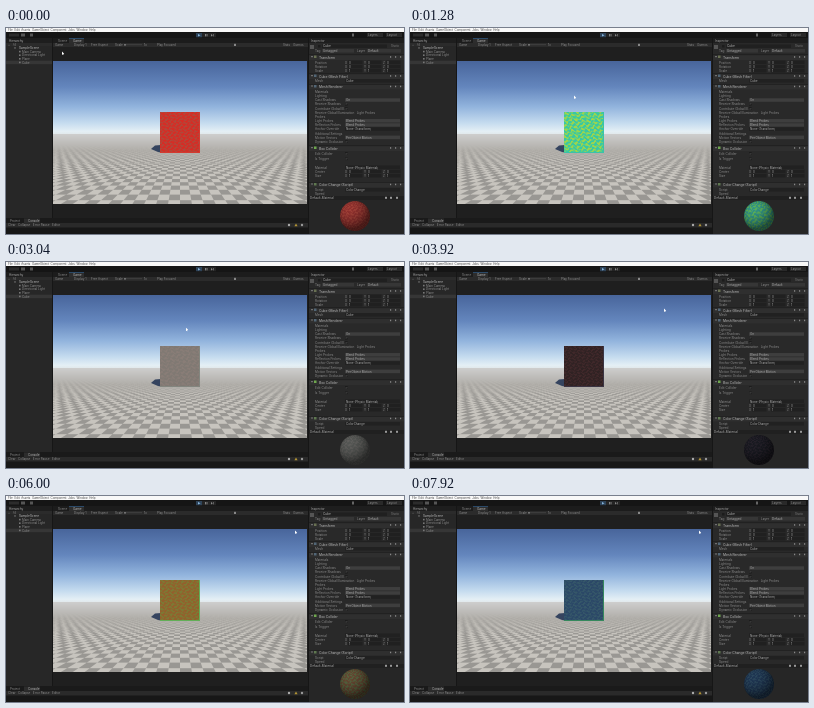
Animation of 398x206 px, one loop 8 s. Source, as an HTML page with a canvas:

```html
<!DOCTYPE html>
<html lang="en">
<head>
<meta charset="utf-8">
<title>Cube colour change in an editor</title>
<style>
html, body { margin: 0; width: 100%; height: 100%; overflow: hidden; background: #191919; }
canvas { display: block; }
</style>
</head>
<body>
<canvas id="stage" width="398" height="206"></canvas>
<script>
const W = 398, H = 206, LOOP = 8000, STEP = 80;
const stage = document.getElementById('stage').getContext('2d');
const layer = (w, h) => Object.assign(document.createElement('canvas'), { width: w, height: h });
const back = layer(W, H);
let g = back.getContext('2d');

const box = (x, y, w, h, c) => { g.fillStyle = c; g.fillRect(x, y, w, h); };
const text = (s, x, y, c = '#8c8c8c', size = 3.1) => {
  g.font = size + 'px Inter, Roboto, sans-serif';
  g.fillStyle = c;
  g.fillText(s, x, y);
};
const poly = (c, ...p) => {
  g.fillStyle = c;
  g.beginPath();
  for (let i = 0; i < p.length; i += 2) g.lineTo(p[i], p[i + 1]);
  g.fill();
};
const disc = (x, y, r, c) => {
  g.fillStyle = c;
  g.beginPath();
  g.arc(x, y, r, 0, 7);
  g.fill();
};
const clamp = v => Math.max(0, Math.min(1, v));
const mix = (a, b, k) => a + (b - a) * k;
const rgb = h => [0, 2, 4].map(i => parseInt(h.substr(i, 2), 16));

// Paints every pixel of a w by h area from a function returning [r, g, b, a].
function shade(w, h, pixel) {
  const c = layer(w, h), q = c.getContext('2d'), img = q.createImageData(w, h);
  for (let y = 0, i = 0; y < h; y++)
    for (let x = 0; x < w; x++, i += 4) img.data.set(pixel(x, y), i);
  q.putImageData(img, 0, 0);
  return c;
}

function drawScene() {
  const sky = g.createLinearGradient(0, 33, 0, 107);
  [[0, '#48659b'], [.35, '#6486bd'], [.62, '#92b4dd'], [.84, '#c6dcef'], [.95, '#e4eff5'], [1, '#e0e6e8']]
    .forEach(([at, c]) => sky.addColorStop(at, c));
  box(47, 33, 254, 143, sky);

  // Perspective checker: horizon 104.5, twelve tiles along the cube's side
  const N = 5, focal = 62, tiles = 12;
  const dark = [153, 151, 147], light = [199, 196, 190], mist = [205, 205, 204];
  const floor = shade(254, 70, (px, py) => {
    let sum = 0;
    for (let j = 0; j < N; j++) for (let i = 0; i < N; i++) {
      const z = focal / (py + 1.5 + (j + .5) / N);
      const x = (px + (i + .5) / N - 127) * z / 124;
      sum += (Math.floor(x * tiles + 600) + Math.floor(z * tiles)) & 1;
    }
    const k = mix(.5, sum / N / N, clamp((py - 10) / 22)), haze = 1 - clamp(py / 16);
    return [...dark.map((v, n) => mix(mix(v, light[n], k), mist[n], haze)), 255];
  });
  g.drawImage(floor, 47, 106);
  poly('#35445f', 145, 121, 149, 117.5, 155, 117, 155, 124.5, 152, 124);
}

function drawHeader(y, name, icon) {
  box(303, y - 4, 95, 5.5, '#2f2f2f');
  box(303, y - 4, 95, .6, '#191919');
  poly('#888', 305, y - 2.5, 307, y - 2.5, 306, y - .8);
  box(308, y - 3, 2.5, 2.5, icon);
  text(name, 313, y, '#bbb', 3.3);
  [384, 389, 394].forEach(x => box(x, y - 2.3, 1.2, 1.5, '#888'));
}
function drawField(label, y, value, fill = '#212121') {
  text(label, 309, y);
  if (value === true) { box(339, y - 2.5, 2.6, 2.6, '#1c1c1c'); text('✓', 339, y, '#999', 3); }
  else if (value) { box(339, y - 3, 55, 3.5, fill); text(value, 340, y, '#aaa', 3); }
}
function drawVector(label, y, n) {
  text(label, 309, y);
  ['X', 'Y', 'Z'].forEach((a, i) => {
    const x = 339 + i * 19;
    text(a, x, y, '#888', 3);
    box(x + 3, y - 3, 14.5, 3.5, '#202020');
    text(n, x + 4, y, '#aaa', 3);
  });
}

function drawInspector() {
  const menu = '#3e3e3e';
  box(303, 10, 95, 196, '#292929');
  box(303, 10, 95, 5, '#1e1e1e');
  text('Inspector', 305, 13.6, '#aaa');
  box(304, 17, 4, 4, '#555');
  box(312, 17, 2.5, 2.5, '#1c1c1c');
  box(316, 16.5, 65, 3.5, '#202020');
  text('Cube', 317, 19.3, '#bbb');
  text('Static', 385, 19.3, '#777');
  text('Tag', 309, 24);
  box(316, 21, 32, 3.6, '#363636');
  text('Untagged', 317, 24, '#aaa');
  text('Layer', 351, 24);
  box(361, 21, 34, 3.6, '#363636');
  text('Default', 362, 24, '#aaa');

  drawHeader(30.5, 'Transform', '#687052');
  drawVector('Position', 35.5, '0');
  drawVector('Rotation', 39.8, '0');
  drawVector('Scale', 44, '1');
  drawHeader(49.5, 'Cube (Mesh Filter)', '#526676');
  drawField('Mesh', 54, 'Cube');
  drawHeader(60, 'Mesh Renderer', '#526676');
  [
    ['Materials'], ['Lighting'], ['Cast Shadows', 'On', menu], ['Receive Shadows', true],
    ['Contribute Global Ill.', true], ['Receive Global Illumination   Light Probes'], ['Probes'],
    ['Light Probes', 'Blend Probes', menu], ['Reflection Probes', 'Blend Probes', menu],
    ['Anchor Override', 'None (Transform)'], ['Additional Settings'],
    ['Motion Vectors', 'Per Object Motion', menu], ['Dynamic Occlusion', true]
  ].forEach(([l, v, c], i) => drawField(l, 65 + i * 4.15, v, c));
  drawHeader(121.5, 'Box Collider', '#6fa84e');
  drawField('Edit Collider', 126.5, true);
  drawField('Is Trigger', 132, true);
  drawField('Material', 140.5, 'None (Physic Material)');
  drawVector('Center', 144.7, '0');
  drawVector('Size', 149, '1');
  drawHeader(158, 'Color Change (Script)', '#5f7850');
  drawField('Script', 163, 'ColorChange');
  text('Speed', 309, 167);
  box(303, 168, 95, 4, '#202020');
  text('Default-Material', 304, 171, '#aaa');
  [379, 384, 390].forEach(x => box(x, 168.8, 2, 2, '#999'));
  box(303, 172, 95, 34, '#262626');
}

function drawEditor() {
  box(0, 0, W, H, '#161616');
  box(0, 0, W, 4, '#f8f8f8');
  text('File  Edit  Assets  GameObject  Component  Jobs  Window  Help', 2, 3.1, '#444', 2.9);
  box(0, 4, W, 6, '#151515');
  box(3, 5.5, 10, 3, '#2c2c2c');
  box(15, 5.5, 4, 3, '#555');
  box(24, 5.5, 3, 3, '#555');
  box(190, 5, 20, 4.2, '#242424');
  box(190, 5, 6, 4.2, '#2e4358');
  poly('#86b4dc', 192, 5.9, 194.5, 7.2, 192, 8.5);
  box(199, 6, .8, 2.4, '#999'); box(200.6, 6, .8, 2.4, '#999');
  poly('#888', 205, 6, 206.8, 7.2, 205, 8.4); box(207, 6, .6, 2.4, '#888');
  box(346, 5.5, 2, 3, '#666');
  ['Layers', 'Layout'].forEach((s, i) => { box(361 + i * 19, 5, 16, 4, '#292929'); text(s, 362 + i * 19, 8.1); });

  box(0, 10, 46, 180, '#272727');
  box(0, 10, 46, 5, '#1e1e1e');
  text('Hierarchy', 3, 13.6, '#aaa');
  box(0, 15, 46, 3, '#2b2b2b');
  text('+   All', 2, 17.6, '#777');
  poly('#888', 8, 19.5, 10, 19.5, 9, 21);
  text('SampleScene', 13, 21.3, '#bbb');
  ['Main Camera', 'Directional Light', 'Plane', 'Cube'].forEach((s, i) => {
    const y = 24.8 + i * 3.6;
    if (i === 3) box(0, y - 2.9, 46, 3.5, '#363636');
    box(13, y - 2, 1.6, 1.6, '#777');
    text(s, 16, y, '#8c8c8c', 3);
  });

  box(47, 10, 255, 180, '#1f1f1f');
  box(47, 10, 255, 5, '#1c1c1c');
  text('Scene', 52, 13.8);
  box(63, 10, 15, 5, '#2d2d2d');
  box(63, 10, 15, .6, '#2c5e90');
  text('Game', 67, 13.8, '#bbb');
  box(47, 15, 255, 4, '#2b2b2b');
  [['Game', 49], ['Display 1', 68], ['Free Aspect', 85], ['Scale', 109], ['1x', 138],
    ['Play Focused', 151], ['Stats', 277], ['Gizmos', 287]].forEach(([s, x]) => text(s, x, 17.8, '#8c8c8c', 3));
  box(118, 16.6, 18, .5, '#555');
  disc(119, 16.8, .9, '#888');
  box(228, 15.8, 2, 2.2, '#888');

  box(0, 190, 302, 5, '#1a1a1a');
  text('Project', 4, 194, '#8c8c8c', 3);
  box(18, 190.5, 16, 4.5, '#2c2c2c');
  text('Console', 22, 194, '#bbb', 3);
  box(0, 195, 302, 4.5, '#2a2a2a');
  text('Clear   Collapse   Error Pause   Editor', 2, 198.2, '#8c8c8c', 3);
  disc(283, 197, 1.2, '#aaa');
  poly('#b39435', 290, 195.6, 291.6, 198.3, 288.4, 198.3);
  disc(296, 197, 1.2, '#999');
  box(0, 200, 302, 6, '#171717');
  drawScene();
  drawInspector();
}

// time, cube base, cube spots, edge, ball base, ball spots, pattern frequency
const looks = [
  [0, 'd62c25', 'b0483a', 'd33a30', '7c2927', '8c3830', 1.9],
  [1280, '38c8a4', '9cd64c', '3bc2a8', '2b8074', '4f9a4e', 1.6],
  [2240, 'c8c8bb', 'cbcabd', 'c4d0b6', '777a70', '828479', 1.4],
  [3920, '302223', '40282a', '3b3443', '15161c', '201c24', 2],
  [5200, '70cdc4', 'b8d096', '68c7d7', '525f8c', '806a92', 2],
  [6000, '93602c', '7c7a34', '62ae57', '573c2a', '4a5636', 1.8],
  [7920, '2b4867', '355769', '35885d', '1a2e47', '253d50', 1.9]
];
function lookAt(t) {
  let i = 0;
  while (i < looks.length - 2 && t >= looks[i + 1][0]) i++;
  const a = looks[i], b = looks[i + 1], k = clamp((t - a[0]) / (b[0] - a[0]));
  const colours = [1, 2, 3, 4, 5].map(n => {
    const p = rgb(a[n]), q = rgb(b[n]);
    return p.map((v, c) => mix(v, q[c], k));
  });
  return [...colours, mix(a[6], b[6], k)];
}
// Wavy, slightly tilted bands broken up by a slower ripple
function spots(x, y, f, phase) {
  const warp = 1.7 * Math.sin(x * f * .36 + phase) + 1.2 * Math.sin(x * f * .83 - y * .5);
  const v = Math.sin(y * f + x * .3 + warp) + .8 * Math.sin(x * f * .7 + 1.6 * Math.sin(y * f * .47 - phase));
  return clamp(v * .6 + .4);
}
const blend = (a, b, k, light = 1) => a.map((v, c) => mix(v, b[c], k) * light);

function drawCube([base, dots, edge, , , f], phase) {
  const w = 40, h = 41;
  g.drawImage(shade(w, h, (x, y) => {
    const rim = x === w - 1 || y === h - 1;
    return [...(rim ? edge : blend(base, dots, spots(x, y, f, phase))), 255];
  }), 154, 84);
}
function drawBall([, , , base, dots, f], phase) {
  const R = 15;
  g.drawImage(shade(32, 32, (px, py) => {
    const x = (px - 15.5) / R, y = (py - 15.5) / R, d = Math.hypot(x, y);
    const z = Math.sqrt(Math.max(0, 1 - d * d));
    const light = .55 + .65 * clamp(-.35 * x - .5 * y + .7 * z);
    const k = spots(Math.atan2(x, z + .01) * 14, Math.asin(Math.max(-1, Math.min(1, y))) * 14, f, phase);
    return [...blend(base, dots, k, light), 255 * clamp((1 - d) * R + .5)];
  }), 333, 172);
}

const path = [
  [0, 56, 23.5], [160, 56, 23.5], [960, 164, 67.5], [2800, 164, 67.5], [3600, 238, 59],
  [3920, 254, 46.5], [4480, 263, 39], [5200, 295, 33.5], [5440, 295, 33.5], [6000, 289, 34.5], [8000, 289, 34.5]
];
function drawCursor(t) {
  const i = path.findIndex(p => p[0] > t), a = path[i - 1], b = path[i];
  const k = (t - a[0]) / (b[0] - a[0]), s = k * k * (3 - 2 * k);
  const x = mix(a[1], b[1], s), y = mix(a[2], b[2], s);
  poly('#fff', x, y, x + 2.2, y + 2.2, x + 1.3, y + 2.4, x + 1.5, y + 3.5, x, y + 3);
}

drawEditor();
g = stage;
const start = performance.now();
function frame() {
  const t = Math.floor((performance.now() - start) % LOOP / STEP) * STEP;
  const look = lookAt(t), phase = t / 400;
  g.drawImage(back, 0, 0);
  drawCube(look, phase);
  drawBall(look, phase);
  drawCursor(t);
  requestAnimationFrame(frame);
}
frame();
</script>
</body>
</html>
```
